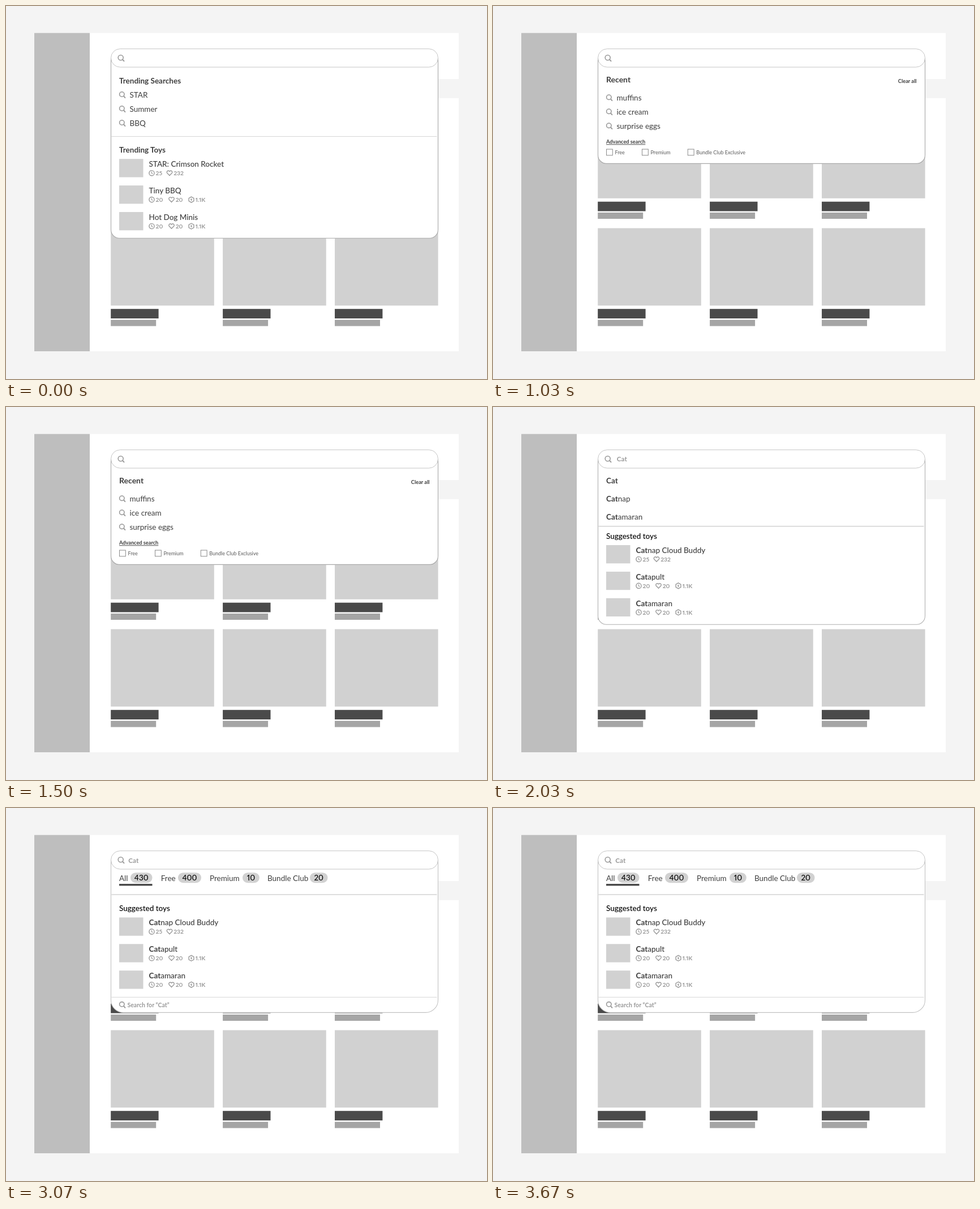
These frames come from a looping animation (850x659 px, 4150 ms). An HTML page:

```html
<!DOCTYPE html>
<html lang="en">
<head>
<meta charset="utf-8">
<title>Search dropdown states</title>
<style>
  html, body { margin: 0; width: 100%; height: 100%; overflow: hidden; background: #f4f4f4; }
  svg { display: block; width: 850px; height: 659px; }
  text { font-family: Lato, sans-serif; font-variant-numeric: proportional-nums; white-space: pre; }
</style>
</head>
<body>
<svg id="stage" viewBox="0 0 850 659"></svg>
<script>
const DARK = '#3e3e3e', MUTED = '#999', CARD = '#d1d1d1', INK = '#000';
const LOOP = 4150;

const rect = (x, y, w, h, fill, extra = '') =>
  `<rect x="${x}" y="${y}" width="${w}" height="${h}" fill="${fill}" ${extra}/>`;

const text = (x, y, content, { size = 13.5, weight = 400, fill = DARK, extra = '' } = {}) =>
  `<text x="${x}" y="${y}" font-size="${size}" font-weight="${weight}" fill="${fill}" ${extra}>${content}</text>`;

const stroke = (d, color, width = 1, fill = 'none') =>
  `<path d="${d}" fill="${fill}" stroke="${color}" stroke-width="${width}"/>`;

const divider = (y, color = '#d6d6d6') => stroke(`M186.5 ${y}H761.5`, color);

const bold = { weight: 700 };
const medium = { weight: 500 };
const match = rest => `<tspan font-weight="700">Cat</tspan>${rest}`;

// Magnifier centred on its lens
const magnifier = (x, y, r = 4.2) =>
  `<circle cx="${x}" cy="${y}" r="${r}" fill="none" stroke="${MUTED}" stroke-width="1.6"/>` +
  stroke(`M${x + r * 0.7} ${y + r * 0.7}l3.2 3.6`, MUTED, 1.9);

const clock = (x, y) =>
  `<circle cx="${x}" cy="${y}" r="4.6" fill="none" stroke="${MUTED}" stroke-width="1.4"/>` +
  stroke(`M${x} ${y - 2.7}v3l1.9 1.2`, MUTED, 1.2);

const heart = (x, y) => stroke(
  `M${x} ${y + 4.3}l-4.1-4.2c-2.2-2.6 1.7-6.2 4.1-3.1c2.4-3.1 6.3.5 4.1 3.1z`, MUTED, 1.4);

const boltBadge = (x, y) =>
  stroke(`M${x} ${y - 5}l4.4 2.5v5l-4.4 2.5l-4.4-2.5v-5z`, MUTED, 1.4) +
  `<path d="M${x + 0.6} ${y - 3.2}l-2.7 3.7h1.8l-.4 2.7l2.7-3.7h-1.8z" fill="${MUTED}"/>`;

const stat = (x, y, value) => text(x, y + 3.7, value, { size: 10.3, weight: 700, fill: MUTED });

function toys(top, titles) {
  return titles.map((title, i) => {
    const y = top + i * 46.9, mid = y + 25;
    const heartX = i ? 292.5 : 289;
    return rect(200, y, 42.5, 32.3, CARD) +
      text(252.5, y + 14, title, medium) +
      clock(257.5, mid) + stat(264.5, mid, i ? 20 : 25) +
      heart(heartX, mid) + stat(heartX + 7.2, mid, i ? 20 : 232) +
      (i ? boltBadge(327.5, mid) + stat(334.8, mid, '1.1K') : '');
  }).join('');
}

const searches = (firstY, words) => words.map((word, i) => {
  const y = firstY + i * 25;
  return magnifier(204.8, y - 6) + text(218.5, y, word);
}).join('');

function dropdown(bottom, radius, border, content, query = '', queryX = 0, queryY = 0) {
  const outline = `M185.5 92V${bottom - radius}a${radius} ${radius} 0 0 0 ${radius} ${radius}` +
    `H${763.5 - radius}a${radius} ${radius} 0 0 0 ${radius} ${-radius}V92`;
  return stroke(outline, border, 1.1, '#fff') +
    rect(185.5, 75.7, 578, 32.3, '#fff', 'rx="16.1" stroke="#c6c6c6"') +
    magnifier(202.7, 91.2, 4.5) +
    text(queryX, queryY, query, { size: 11.7, weight: 700, fill: MUTED }) + content;
}

function page() {
  let out = rect(50, 47.7, 98, 562.3, '#bebebe') + rect(148, 47.7, 652, 562.3, '#fff') +
    rect(764.5, 129, 35.5, 33.7, '#f4f4f4');
  for (const y of [203, 392.5])
    for (const x of [185.2, 383.1, 581])
      out += rect(x, y, 182.6, 136.8, CARD) + rect(x, y + 142.7, 84.4, 16.8, '#4a4a4a') +
        rect(x, y + 161.9, 80, 11.1, '#a5a5a5');
  return out;
}

const trending = () =>
  text(200, 137, 'Trending Searches', bold) +
  searches(162, ['STAR', 'Summer', 'BBQ']) +
  divider(230.5) +
  text(200, 259.3, 'Trending Toys', bold) +
  toys(270.2, ['STAR: Crimson Rocket', 'Tiny BBQ', 'Hot Dog Minis']);

const recent = () =>
  text(200, 135, 'Recent', { size: 14, weight: 700 }) +
  text(748.5, 136.3, 'Clear all', { size: 9.2, weight: 700, extra: 'text-anchor="end"' }) +
  searches(167.2, ['muffins', 'ice cream', 'surprise eggs']) +
  text(200, 243.3, 'Advanced search', { size: 9.2, weight: 700, extra: 'text-decoration="underline"' }) +
  [[200.5, 'Free'], [263.5, 'Premium'], [344.3, 'Bundle Club Exclusive']].map(([x, label]) =>
    rect(x, 253, 10.8, 10.8, '#fff', 'stroke="#8a8a8a"') +
    text(x + 15, 261.7, label, { size: 9, fill: '#5c5c5c' })).join('');

const matchedToys = top =>
  text(200, top - 11, 'Suggested toys', { weight: 500, fill: INK }) +
  toys(top, [match('nap Cloud Buddy'), match('apult'), match('amaran')]);

const suggestions = () =>
  ['', 'nap', 'amaran'].map((rest, i) => text(200, 135 + i * 32.2, match(rest))).join('') +
  divider(210.8, '#bdbdbd') + matchedToys(244);

const results = () =>
  [[200, 'All', 220, 38.5, 430], [273.8, 'Free', 304, 41, 400],
   [360, 'Premium', 418, 29.8, 10], [462, 'Bundle Club', 537, 31.5, 20]]
    .map(([x, label, pillX, width, count]) =>
      text(x, 128.5, label) +
      rect(pillX, 114.2, width, 18, CARD, 'rx="9"') +
      text(pillX + width / 2, 128.3, count, { weight: 500, fill: INK, extra: 'text-anchor="middle"' }))
    .join('') +
  rect(200, 134, 58.5, 3.4, '#4a4a4a') +
  divider(153, '#bdbdbd') + matchedToys(193.4) +
  divider(334.3) + magnifier(204.8, 346.8) +
  text(214.5, 351.7, 'Search for “Cat”', { size: 10.5, weight: 700, fill: MUTED });

const scenes = [
  { until: 1030, art: dropdown(410.3, 15, '#a8a8a8', trending()) },
  { until: 2030, art: dropdown(278.4, 15, '#a8a8a8', recent()) },
  { until: 3070, art: dropdown(384.2, 15, '#b0b0b0', suggestions(), 'Cat', 218.8, 96.2) },
  { until: LOOP, art: dropdown(361.4, 22, '#c2c2c2', results(), 'Cat', 216.3, 97) }
];

const stage = document.getElementById('stage');
stage.innerHTML = page() + scenes.map(scene => `<g>${scene.art}</g>`).join('');
const groups = stage.querySelectorAll('g');

const start = performance.now();
function draw() {
  const time = (performance.now() - start) % LOOP;
  const current = scenes.findIndex(scene => time < scene.until);
  groups.forEach((group, i) => group.style.display = i === current ? '' : 'none');
  requestAnimationFrame(draw);
}
draw();
</script>
</body>
</html>
```
